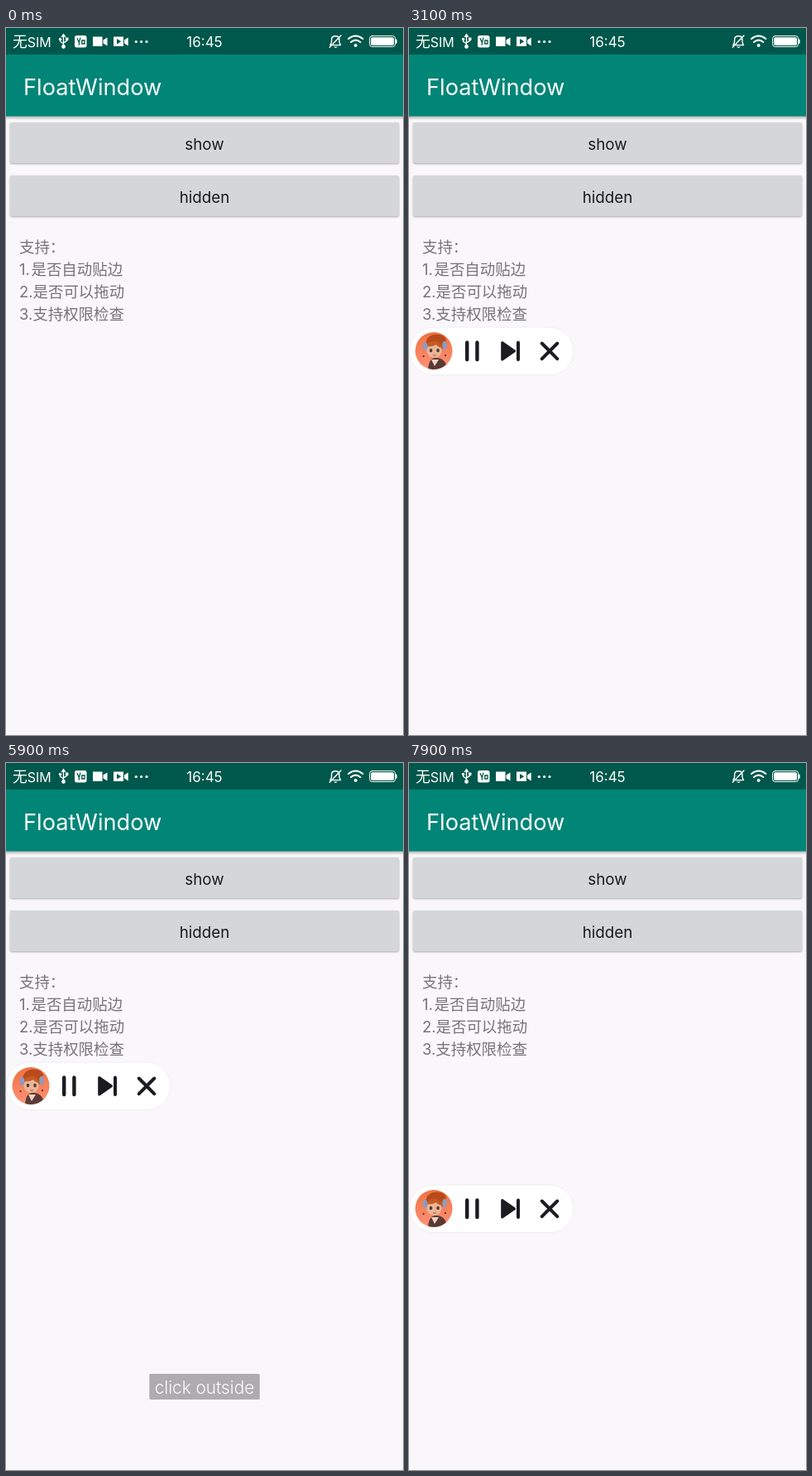
An HTML page that plays this animation: 480x853 px, repeating every 8 s.

```html
<!DOCTYPE html>
<html lang="zh-CN">
<head>
<meta charset="utf-8">
<title>FloatWindow</title>
<style>
  html, body { margin: 0; width: 100%; height: 100%; overflow: hidden; background: #f9f7fa; }
  svg { display: block; width: 100vw; height: 100vh; }
  text { font-family: Inter, "Noto Sans CJK SC", "Noto Sans CJK", sans-serif; }
  .mid { text-anchor: middle; }
  .button { fill: #d5d6d7; filter: drop-shadow(0 1px 1px rgba(0, 0, 0, .32)); }
  .label { font-size: 18.8px; fill: #1b1b1c; text-anchor: middle; }
  .note { font-size: 18.45px; fill: #757476; }
  .bar { fill: #fff; }
  .line { fill: none; stroke: #fff; stroke-linecap: round; stroke-linejoin: round; }
  .ink { fill: #1b1b20; stroke: #1b1b20; stroke-linecap: round; stroke-linejoin: round; }
  .ripple { fill: #000; opacity: 0; transform-box: fill-box; transform-origin: center; }
  .touch { fill: #f6ebe6; fill-opacity: .88; stroke: #cfc6c4; stroke-opacity: .6; opacity: 0; }
  #pill, #toast { opacity: 0; }
</style>
</head>
<body>
<svg viewBox="0 0 480 853" preserveAspectRatio="none">
  <defs>
    <linearGradient id="shade" x2="0" y2="1">
      <stop stop-color="#000" stop-opacity=".3"/>
      <stop offset="1" stop-color="#000" stop-opacity="0"/>
    </linearGradient>
    <linearGradient id="warm" x2="0" y2="1">
      <stop stop-color="#f0713f"/>
      <stop offset="1" stop-color="#ff937a"/>
    </linearGradient>
    <clipPath id="showBox"><rect x="5" y="114" width="470" height="49" rx="2"/></clipPath>
    <clipPath id="hideBox"><rect x="5" y="178" width="470" height="49" rx="2"/></clipPath>
    <clipPath id="disc"><circle cx="30" cy="389.5" r="22.5"/></clipPath>
  </defs>

  <rect width="480" height="853" fill="#f9f7fa"/>
  <rect y="106" width="480" height="5" fill="url(#shade)"/>
  <rect y="31" width="480" height="75.5" fill="#008577"/>
  <rect width="480" height="32" fill="#00574b"/>
  <text x="21" y="81" font-size="27.2" fill="#fff">FloatWindow</text>

  <!-- status bar -->
  <g class="bar">
    <text x="8" y="23" font-size="16"><tspan font-size="17.8">无</tspan>SIM</text>
    <text x="240" y="23" font-size="17" class="mid">16:45</text>
    <path d="M69.5 6.5l3 4.5h-6z"/>
    <circle cx="69.5" cy="22.5" r="2.4"/>
    <circle cx="65.6" cy="13.5" r="1.7"/>
    <rect x="72" y="11.5" width="3.4" height="3.4"/>
    <rect x="83" y="9" width="14.5" height="14.5" rx="2.5"/>
    <path d="M105 10.5h11.5v11.5H105zM117.5 14.5l5-3v10l-5-3z"/>
    <path d="M130 10.5h12v11.5h-12zM143 14.5l4.7-3v10l-4.7-3z"/>
    <circle cx="157.3" cy="16.5" r="1.6"/>
    <circle cx="163.6" cy="16.5" r="1.6"/>
    <circle cx="170" cy="16.5" r="1.6"/>
    <circle cx="422.7" cy="21" r="2"/>
    <rect x="441.2" y="11.2" width="27.8" height="9.8" rx="1.8"/>
    <path d="M471 13.2q1.7 0 1.7 1.5v2.8q0 1.5-1.7 1.5z"/>
    <path d="M396 22.6h5q-2.5 2.6-5 0z"/>
  </g>
  <g class="line" stroke-width="1.4">
    <path d="M69.5 10v12M65.6 14v2.2l3.9 2.8M73.7 14v1.3l-4.2 2.5"/>
    <path d="M391.8 20.6h12.8q-1.6-2-1.6-4.4v-2q0-4.4-4.7-4.4t-4.7 4.4v2q0 2.4-1.8 4.4M405 9L391.3 23.2"/>
    <path stroke-width="2" d="M414 13q8.7-7 17.4 0M417 17q5.7-4.8 11.4 0"/>
    <rect x="439.6" y="9.6" width="31" height="13" rx="3" stroke-width="1"/>
  </g>
  <g fill="none" stroke="#00574b" stroke-width="1.3">
    <path d="M86 12.2l2.3 5.4M90 11.6l-1.7 6v3.2M91.8 15h3.2v4h-3.2z"/>
    <path d="M134 13l5.2 3.2-5.2 3.2z" fill="#00574b" stroke="none"/>
  </g>

  <rect class="button" x="5" y="114" width="470" height="49" rx="2"/>
  <rect class="button" x="5" y="178" width="470" height="49" rx="2"/>
  <g clip-path="url(#showBox)"><circle class="ripple" id="showRipple" cx="240" cy="139" r="250"/></g>
  <g clip-path="url(#hideBox)"><circle class="ripple" id="hideRipple" cx="240" cy="203" r="250"/></g>
  <text class="label" x="240" y="146.5">show</text>
  <text class="label" x="240" y="210.5">hidden</text>

  <g class="note">
    <text x="16" y="271">支持：</text>
    <text x="16" y="298">1.<tspan dx="1.7">是否自动贴边</tspan></text>
    <text x="16" y="325">2.是否可以拖动</text>
    <text x="16" y="352">3.支持权限检查</text>
  </g>

  <g id="pill">
    <rect x=".5" y="361" width="198.5" height="57.5" rx="28.7" fill="#fff" stroke="#efedf1"/>
    <g clip-path="url(#disc)">
      <rect x="7" y="366" width="46" height="47" fill="url(#warm)"/>
      <path d="M23 412q1-14 9-14 9-1 13 8l-6 6z" fill="#5b3a35"/>
      <path d="M27 400l4 8 5-8z" fill="#f3d3c2"/>
      <path d="M20 384q0-12 9-14 13-2 16 6-2 8-5 12H21z" fill="#b84a1c"/>
      <ellipse cx="30.5" cy="389" rx="9.2" ry="8.8" fill="#e9b697"/>
      <path d="M21 384q4-8 12-6 6 1 7 8-5-1-7-4-5 3-12 2z" fill="#c65a24"/>
      <ellipse cx="19.5" cy="384" rx="3" ry="5" fill="#8e9cc0"/>
      <ellipse cx="43" cy="383" rx="2.8" ry="5" fill="#8e9cc0"/>
      <ellipse cx="26.5" cy="389" rx="1.8" ry="2.3" fill="#5a3a33"/>
      <ellipse cx="35" cy="389" rx="1.8" ry="2.3" fill="#5a3a33"/>
      <path d="M29 394.5q2 1.5 4 0" fill="none" stroke="#a8553f"/>
      <circle cx="17.5" cy="396" r="1.2" fill="#7d3527"/>
      <circle cx="44" cy="395" r="1.2" fill="#7d3527"/>
    </g>
    <g class="ink">
      <path fill="none" stroke-width="4.4" d="M70.2 379.5v20.6M82.4 379.5v20.6"/>
      <path stroke-width="3" d="M112.7 379.5v20.6l14.8-10.3z"/>
      <path fill="none" stroke-width="4" d="M132 379.5v20.6"/>
      <path fill="none" stroke-width="4" d="M160.7 380.5l18.6 18.6M179.3 380.5l-18.6 18.6"/>
    </g>
    <circle class="touch" id="grip" cx="37" cy="389" r="12.5"/>
  </g>

  <g id="toast">
    <rect x="173.3" y="737" width="133.5" height="31" rx="1.5" fill="#626163"/>
    <text class="mid" x="240" y="761" font-size="20.8" font-weight="300" fill="#fff">click outside</text>
  </g>
  <circle class="touch" id="tap" r="12.5"/>
</svg>

<script>
const LOOP = 8000;
const HOLD = "steps(1, end)";

// Each step is [time in ms, properties, optional easing to the next step].
function play(id, steps) {
  const frames = steps.map(([at, props, easing = "linear"]) =>
    ({ offset: at / LOOP, easing, ...props }));
  document.getElementById(id).animate(frames, { duration: LOOP, iterations: Infinity });
}

const move = (x, y) => ({ transform: `translate(${x}px, ${y}px)` });
const path = points => points.map(([at, x, y, easing]) => [at, move(x, y), easing]);

// Switches opacity between 0 and 1 at the given times.
const toggle = times => [
  [0, { opacity: 0 }, HOLD],
  ...times.map((at, i) => [at, { opacity: (i + 1) % 2 }, HOLD]),
  [LOOP, { opacity: times.length % 2 }]
];

const ripple = starts => {
  const idle = { opacity: 0, transform: "scale(0)" };
  return [
    [0, idle, HOLD],
    ...starts.flatMap(at => [
      [at, { opacity: .1, transform: "scale(.1)" }],
      [at + 180, { opacity: .1, transform: "scale(.8)" }],
      [at + 330, { opacity: 0, transform: "scale(1)" }, HOLD]
    ]),
    [LOOP, idle]
  ];
};

play("pill", toggle([500, 4550, 5250]));
play("pill", path([
  [0, 0, 100], [1100, 0, 100], [1300, 18, 80], [1600, 58, 22], [1800, 80, 2],
  [1880, 87, 0], [1960, 87, 0, "ease-in-out"], [2300, 0, 0],
  [6350, 0, 0], [6500, 22, 60], [6650, 50, 135], [6750, 55, 148, "ease-in"],
  [6860, 32, 148, "ease-out"], [6980, 3, 148], [7020, 3, 148], [7100, 0, 148], [LOOP, 0, 148]
]));
play("grip", toggle([1000, 1960, 6300, 6750]));

play("tap", toggle([300, 450, 3700, 3800, 4350, 4450, 5000, 5150]));
play("tap", path([
  [0, 240, 139, HOLD], [3000, 240, 560, HOLD], [4000, 240, 203, HOLD],
  [4700, 240, 139, HOLD], [LOOP, 240, 139]
]));
play("showRipple", ripple([300, 5000]));
play("hideRipple", ripple([4350]));

play("toast", [
  [0, { opacity: 0 }], [3700, { opacity: 0 }], [4100, { opacity: 1 }],
  [5700, { opacity: 1 }], [6100, { opacity: 0 }], [LOOP, { opacity: 0 }]
]);
</script>
</body>
</html>
```
